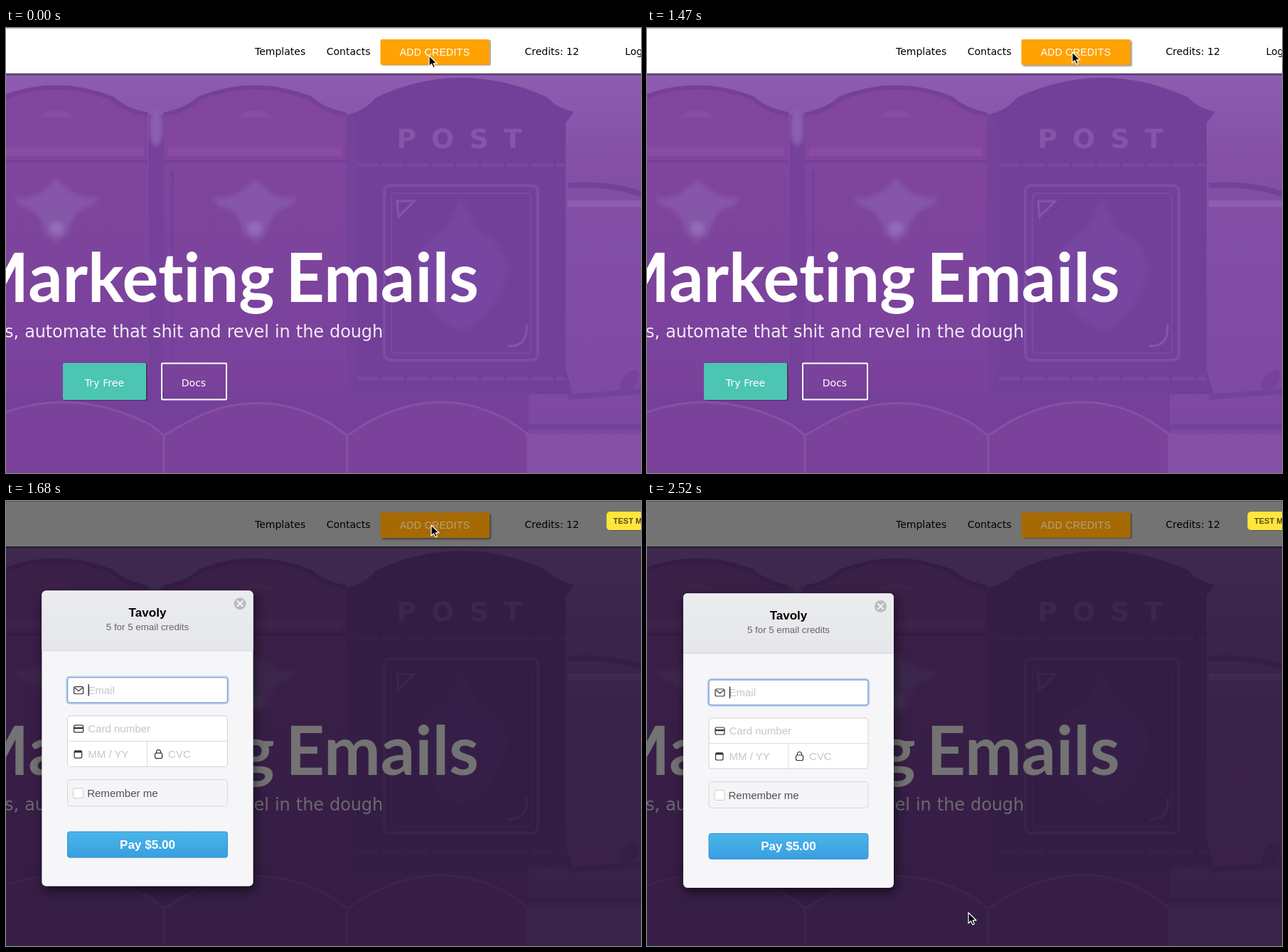
Write an HTML page that moves like this. It is 893 px wide and 627 px high and loops after 2.59 s.

```html
<!DOCTYPE html>
<html lang="en">
<head>
<meta charset="utf-8">
<title>Add credits</title>
<style>
  html, body { margin: 0; width: 100%; height: 100%; overflow: hidden; background: #7a449e; }
  svg { display: block; }
  text { white-space: pre; }
  filter { color-interpolation-filters: sRGB; }
  .title { font: bold 95.3px Lato, sans-serif; font-variant-ligatures: none; word-spacing: -7.5px; }
  .ui { font: 14px "DejaVu Sans", Verdana, sans-serif; }
  .lead { font-size: 24px; word-spacing: .8px; letter-spacing: -.14px; }
  .form { font: 15px "Liberation Sans", Arial, sans-serif; }
  .bold { font-weight: bold; }
  .hint { fill: #c6c6ca; }
  .icon { fill: none; stroke: #333; stroke-width: 1.2; }
  .mid { text-anchor: middle; }
</style>
</head>
<body>
<svg width="893" height="627" viewBox="0 0 893 627">
  <defs>
    <linearGradient id="wall" x2="0" y2="1">
      <stop stop-color="#9263b5"/><stop offset=".3" stop-color="#8450a6"/>
      <stop offset="1" stop-color="#7c47a2"/>
    </linearGradient>
    <linearGradient id="panel" x2="0" y2="1">
      <stop stop-color="#82469d"/><stop offset="1" stop-color="#79429d"/>
    </linearGradient>
    <linearGradient id="head" x2="0" y2="1">
      <stop stop-color="#ebecee"/><stop offset="1" stop-color="#e6e7ea"/>
    </linearGradient>
    <linearGradient id="pay" x2="0" y2="1">
      <stop stop-color="#4ab5ea"/><stop offset="1" stop-color="#399fe0"/>
    </linearGradient>
    <filter id="soft"><feGaussianBlur stdDeviation="3"/></filter>
    <filter id="drop" x="-20%" y="-20%" width="140%" height="140%">
      <feDropShadow dy="6" stdDeviation="8" flood-opacity=".6"/>
    </filter>
    <filter id="low" x="-10%" y="-20%" width="120%" height="150%">
      <feDropShadow dy="1" stdDeviation=".7" flood-opacity=".3"/>
    </filter>
    <filter id="raised" x="-10%" y="-20%" width="120%" height="150%">
      <feDropShadow dy="2" stdDeviation="1.1" flood-opacity=".4"/>
    </filter>
    <path id="arch" d="M-128 122Q-96 116-78 99Q0 68 78 99Q96 116 128 122"/>
    <g id="box">
      <path d="M-128 122Q-96 116-78 99Q0 68 78 99Q96 116 128 122V512H-128Z" fill="url(#panel)"/>
      <use href="#arch" fill="none" stroke="#74409a" stroke-width="6"/>
      <path d="M-122 168H122V180H-122Z" fill="#884ca3"/>
      <path d="M-128 188H128M-116 200V470" stroke="#753f9a" stroke-width="4"/>
      <path d="M-26 126Q0 106 26 126Z" fill="#8a4ca3"/>
      <path d="M-60 238Q-30 246 0 212Q30 246 60 238L50 252Q24 252 16 290L0 302L-16 290Q-24 252-50 252Z"
        fill="#8656a9" filter="url(#soft)"/>
      <circle cy="282" r="10" fill="#946bb8" filter="url(#soft)"/>
      <path d="M-128 472H128V512H-128Z" fill="#7a429b"/>
    </g>
  </defs>

  <!-- Backdrop -->
  <rect width="893" height="627" fill="url(#wall)"/>
  <rect y="490" width="735" height="137" fill="#754099"/>
  <path d="M200 122H228V512H200ZM470 122H500V512H470Z" fill="#75419b"/>
  <ellipse cx="211" cy="140" rx="9" ry="26" fill="#8d60b2" filter="url(#soft)"/>
  <use href="#box" x="71"/>
  <use href="#box" x="350"/>
  <path d="M480 122Q506 116 520 98Q640 42 762 98Q772 112 799 118L787 134V480L797 516H486L494 480V134Z" fill="#734099"/>
  <path d="M494 193H786M494 494H786" stroke="#7a48a0" stroke-width="5" stroke-dasharray="30 5"/>
  <text x="648" y="169" class="ui bold mid" fill="#8455a9" style="font-size:38px;letter-spacing:21px">POST</text>
  <rect x="532" y="222" width="216" height="246" rx="8" fill="none" stroke="#7d4da3" stroke-width="4"/>
  <rect x="542" y="233" width="196" height="225" rx="5" fill="none" stroke="#7b49a0" stroke-width="2"/>
  <path d="M640 240L662 284Q700 300 706 340Q690 408 640 428Q590 408 576 340Q580 300 618 284Z"
    fill="#7746a0" filter="url(#soft)"/>
  <path d="M550 244h24l-22 22zM706 448q28 2 26-30" fill="none" stroke="#8455a8" stroke-width="3"/>
  <path d="M735 572H893V627H735Z" fill="#8350a6"/>
  <path d="M790 222Q850 218 893 234M735 562H893M790 520L893 512" fill="none" stroke="#74429a" stroke-width="8"/>
  <path d="M790 243H893V252H790Z" fill="#8d5fb1"/>
  <ellipse cx="877" cy="498" rx="10" ry="18" fill="#77429a" transform="rotate(35 877 498)"/>
  <g fill="#7b429b" stroke="#8750a5" stroke-width="3">
    <path d="M-60 570Q70 490 205 560L222 574V640H-60Z"/>
    <path d="M222 574L250 558Q350 500 455 556L480 574V640H222Z"/>
    <path d="M480 574L508 556Q610 500 705 552L734 572V640H480Z"/>
  </g>

  <!-- Hero -->
  <text x="665" y="386" text-anchor="end" class="title" fill="#fff">Marketing Emails</text>
  <g class="ui"><text x="530" y="436" text-anchor="end" class="lead" fill="#f1eaf5">s, automate that shit and revel in the dough</text></g>
  <g class="ui mid" fill="#fff">
    <rect x="80" y="472" width="117" height="52" rx="2" fill="#4cc5b3" filter="url(#low)"/>
    <text x="138.5" y="505" letter-spacing=".1">Try Free</text>
    <rect x="219" y="472.5" width="91" height="51" rx="1" fill="none" stroke="#fff" stroke-width="2"/>
    <text x="264" y="505">Docs</text>
  </g>

  <!-- Top bar -->
  <rect y="64" width="893" height="3" fill="#3b1d52" opacity=".35"/>
  <rect width="893" height="64" fill="#fff"/>
  <path d="M0 .5H893" stroke="#bbb"/>
  <path d="M0 64.5H893" stroke="#4c3a58"/>

  <rect id="shade" width="893" height="627"/>

  <g class="ui">
    <text x="350" y="37.5">Templates</text>
    <text x="450.7" y="37.5">Contacts</text>
    <text x="729.5" y="37.5">Credits: 12</text>
    <text x="870.5" y="37.5">Logout</text>
  </g>
  <rect id="add" x="526.5" y="16" width="153.5" height="36" rx="2"/>
  <text id="addText" x="603" y="38.5" class="form mid" style="font-size:14px;letter-spacing:.35px">ADD CREDITS</text>

  <g id="badge">
    <rect x="844.5" y="15" width="90" height="26" rx="5" fill="#ffe63c" filter="url(#low)"/>
    <text x="854" y="32" class="form bold" fill="#57491a" style="font-size:11px">TEST MODE</text>
  </g>

  <!-- Payment form -->
  <g id="modal" class="form">
    <rect x="51" y="130" width="296" height="415" rx="6" fill="#f6f6f9" filter="url(#drop)"/>
    <path d="M51 214V136a6 6 0 0 1 6-6H341a6 6 0 0 1 6 6V214Z" fill="url(#head)"/>
    <path d="M51 214.5H347" stroke="#d3d4d8"/>
    <circle cx="328.5" cy="148.5" r="8.5" fill="#bcbdc0"/>
    <path d="M324.5 144.5l8 8m0-8l-8 8" stroke="#fff" stroke-width="1.7"/>
    <text x="199" y="167" class="bold mid" style="font-size:17px">Tavoly</text>
    <text x="199" y="186" class="mid" fill="#66666b" style="font-size:13.3px">5 for 5 email credits</text>

    <rect x="86.5" y="251.5" width="225" height="36.5" rx="4" fill="none" stroke="#a9c6ef" stroke-width="4" opacity=".6"/>
    <rect x="87" y="252" width="224" height="35.5" rx="3.5" fill="#fff" stroke="#7ba2d8" stroke-width="1.4"/>
    <rect x="87" y="306" width="224" height="71" rx="4" fill="#fff" stroke="#d3d3d7"/>
    <path d="M87 341.5H311M198.5 341.5V377" stroke="#dcdce0"/>
    <rect x="87" y="395.5" width="224" height="37" rx="4" fill="#f5f5f8" stroke="#d8d8dc"/>
    <rect x="95" y="407.5" width="14" height="14" rx="2.5" fill="#fff" stroke="#cfcfd3"/>
    <rect x="87" y="468.5" width="224" height="36" rx="3.5" fill="url(#pay)" stroke="#3590d0"/>

    <g class="icon">
      <rect x="96" y="265" width="13" height="10" rx="2"/>
      <path d="M97 266.5l5.5 4.5 5.5-4.5"/>
      <rect x="96" y="319" width="13" height="10" rx="2"/>
      <path d="M96 323H109" stroke-width="2.4"/>
      <rect x="96.5" y="355" width="10.5" height="10" rx="2"/>
      <path d="M96.5 356H107" stroke-width="3"/>
      <rect x="209.5" y="358" width="10" height="7.5" rx="2"/>
      <path d="M211.5 358v-1.5a3 3 0 0 1 6 0V358"/>
    </g>
    <g class="hint">
      <text x="115.5" y="275">Email</text>
      <text x="115.5" y="329">Card number</text>
      <text x="115.5" y="364.5">MM / YY</text>
      <text x="228" y="364.5">CVC</text>
    </g>
    <path id="caret" d="M116.5 261.5V278" stroke="#222" stroke-width="1.3"/>
    <text x="114.5" y="420" fill="#505055">Remember me</text>
    <text x="199" y="492" class="bold mid" fill="#fff" style="font-size:17px">Pay $5.00</text>
  </g>

  <g id="cursor" stroke-linejoin="round">
    <path id="arrow" d="M0 0V15l3.5-3.3 2.4 5.3 2.5-1.1-2.3-5.1h4.9Z" stroke="#fff" stroke-width="1.2"/>
    <path id="hand" fill="#fff" stroke="#111" stroke-width="1.2"
      d="M-1.5 1.5Q0-1 1.5 1.5V6Q3 4.5 4 6.3Q6 5 6.7 7Q8.5 6.3 9 8.5V12L7.5 16H-1L-5.5 10Q-6 7.5-3.5 8.3L-1.5 10ZM1.5 12V14M4 12V14"/>
  </g>
</svg>
<script>
  const LOOP = 2590, STEP = 70, OPEN = 1540;
  const el = id => document.getElementById(id);
  const set = (id, attrs) => {
    for (const name in attrs) el(id).setAttribute(name, attrs[name]);
  };

  // Linear interpolation through [time, value] points.
  function track(points, t) {
    const i = points.findIndex(p => p[0] > t);
    if (i < 0) return points[points.length - 1][1];
    if (i === 0) return points[0][1];
    const [t0, a] = points[i - 1], [t1, b] = points[i];
    return a + (b - a) * (t - t0) / (t1 - t0);
  }

  const cursorX = [[0, 595], [140, 598], [1890, 598], [2030, 588], [2240, 520], [2380, 465], [2450, 452]];
  const cursorY = [[0, 39], [140, 35], [1400, 34], [1890, 34], [2030, 60], [2240, 330], [2380, 540], [2450, 580]];
  const bounce = [[OPEN, 3], [1610, -2.5], [1680, -3], [1750, -1.2], [1820, -.3], [1890, 0]];

  function draw(t) {
    const open = t >= OPEN, hand = t >= 70 && t < 1400;
    const fade = open ? track([[OPEN, .92], [1610, 1]], t) : 0;
    const dy = track(bounce, t);

    set('shade', { opacity: open ? track([[OPEN, .44], [1610, .55]], t) : 0 });
    set('add', {
      fill: !open ? '#ffa204' : t < 1610 ? '#b07106' : '#a66a05',
      filter: t >= 70 && t < 2030 ? 'url(#raised)' : 'url(#low)'
    });
    set('addText', { fill: !open ? '#fff' : t < 1610 ? '#c9b48c' : '#b9a27c' });
    set('badge', { opacity: fade && fade - .08 * (t < 1610) });
    set('modal', {
      opacity: fade,
      transform: `translate(199 ${337.5 + dy}) scale(${1 - dy * .0014}) translate(-199 -337.5)`
    });
    set('caret', { opacity: Math.floor((t - 1500) / 500) % 2 ? 0 : 1 });
    set('cursor', { transform: `translate(${track(cursorX, t)} ${track(cursorY, t)})` });
    set('arrow', { visibility: hand ? 'hidden' : 'visible' });
    set('hand', { visibility: hand ? 'visible' : 'hidden' });
  }

  function tick() {
    draw(Math.floor(performance.now() % LOOP / STEP) * STEP);
    requestAnimationFrame(tick);
  }
  tick();
</script>
</body>
</html>
```
